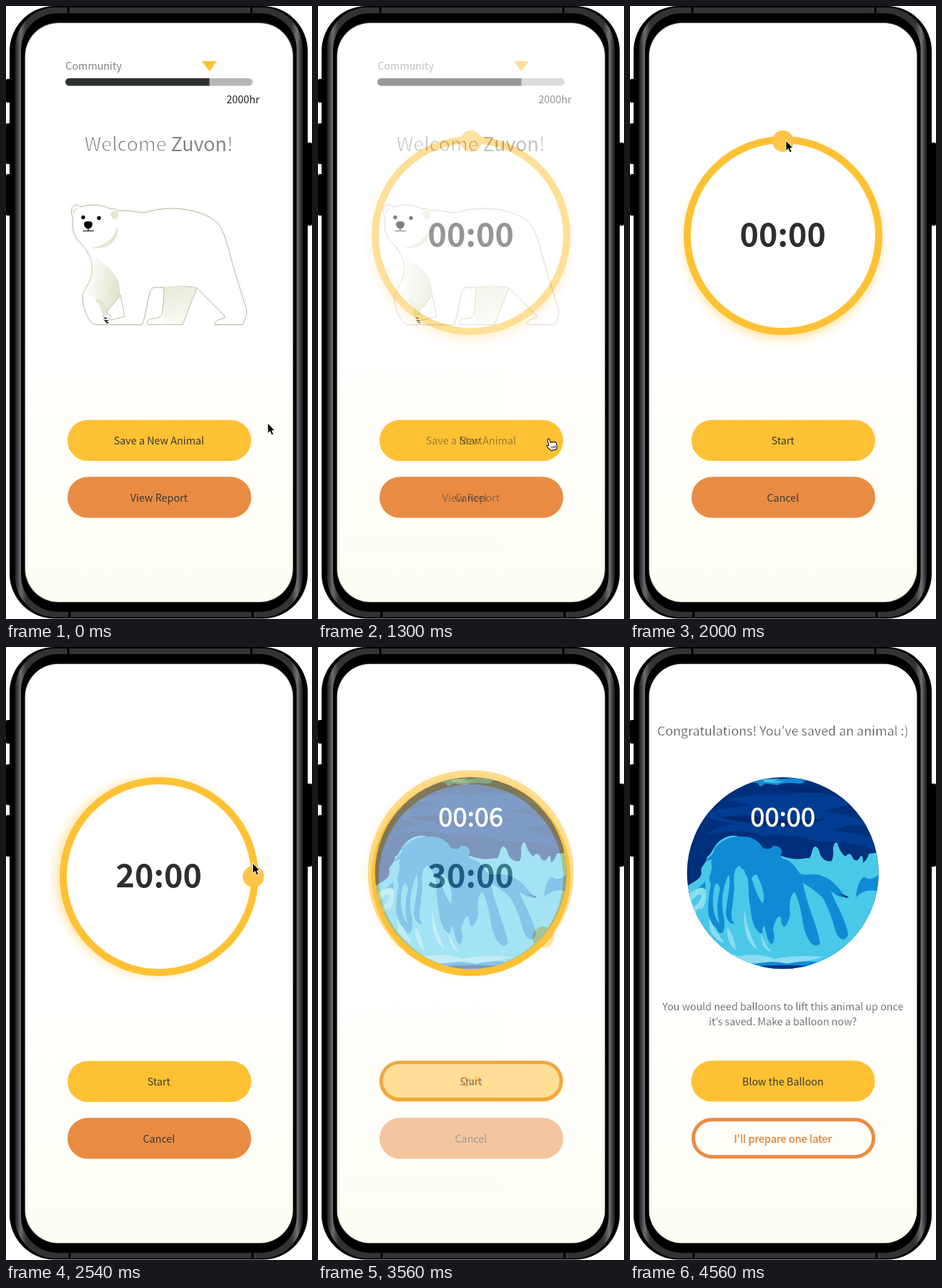
Recreate the animation shown at these times as an HTML page. Size 428 by 857 pixels, loop 6560 ms.

```html
<!DOCTYPE html>
<html lang="en">
<head>
<meta charset="utf-8">
<title>Save an animal</title>
<style>
html, body { margin: 0; width: 100%; height: 100%; overflow: hidden; background: #fff; }
svg { display: block; width: 428px; height: 857px; }
text {
  font: 400 14.33px "Noto Sans CJK JP", "Noto Sans CJK KR", "Noto Sans CJK SC", "Noto Sans", sans-serif;
  text-anchor: middle; fill: #3d3b32;
}
.community { text-anchor: start; fill: #828282; }
.hours { text-anchor: end; fill: #222; }
/* A white stroke thins the letters, a coloured one thickens them. */
.welcome { font-size: 26.8px; fill: #7c7c7c; stroke: #fff; stroke-width: .9; }
.welcome tspan { fill: #858585; stroke: none; }
.clock { font-size: 44.8px; font-weight: 700; fill: #2e2e30; }
.count { font-size: 36.4px; fill: #fff; stroke: #fff; stroke-width: .8; }
.congrats { font-size: 17.85px; fill: #3c3c3c; stroke: #fff; stroke-width: .5; }
.note { font-size: 14.25px; fill: #555; stroke: #fff; stroke-width: .25; }
.outlined { font-size: 14.6px; fill: #e0883f; stroke: #e0883f; stroke-width: .35; }
.yellow { fill: #ffc134; }
.orange { fill: #e98c43; }
.outline { fill: none; stroke: #e98c43; stroke-width: 5; }
.fur { fill: #fff; stroke: #aeab90; stroke-width: .8; stroke-linejoin: round; }
</style>
</head>
<body>
<svg viewBox="0 0 428 857">
  <defs>
    <linearGradient id="paper" x1="0" y1="0" x2="0" y2="1">
      <stop offset=".5" stop-color="#fff"/>
      <stop offset=".8" stop-color="#fffef8"/>
      <stop offset="1" stop-color="#fcfdf3"/>
    </linearGradient>
    <linearGradient id="metal" x1="0" y1="0" x2="1" y2="0">
      <stop offset="0" stop-color="#1c1c1d"/>
      <stop offset=".012" stop-color="#4a4a4c"/>
      <stop offset=".019" stop-color="#6c6c6e"/>
      <stop offset=".04" stop-color="#333335"/>
      <stop offset=".96" stop-color="#333335"/>
      <stop offset=".981" stop-color="#737176"/>
      <stop offset=".988" stop-color="#4f4e51"/>
      <stop offset="1" stop-color="#1c1c1d"/>
    </linearGradient>
    <linearGradient id="chest" x1="0" y1=".2" x2="1" y2=".4">
      <stop offset=".1" stop-color="#fff"/>
      <stop offset="1" stop-color="#e0e3cb"/>
    </linearGradient>
    <linearGradient id="thigh" x1=".2" y1="0" x2=".4" y2="1">
      <stop offset="0" stop-color="#e8ead9"/>
      <stop offset="1" stop-color="#fafaf3"/>
    </linearGradient>
    <filter id="soft" x="-20%" y="-20%" width="140%" height="140%"><feGaussianBlur stdDeviation="7"/></filter>
    <filter id="shade" x="-10%" y="-10%" width="120%" height="120%"><feGaussianBlur stdDeviation="2"/></filter>
    <clipPath id="disc"><circle cx="213.7" cy="316" r="134"/></clipPath>

    <rect id="bg" x="27" y="24" width="374" height="809" rx="46" fill="url(#paper)"/>
    <rect id="button" x="86" y="578.7" width="257" height="57.4" rx="28.7"/>
    <rect id="hollow" x="88.3" y="580.5" width="252" height="52" rx="26"/>

    <path id="body" d="M94 296C89 287 92 279 98 278Q102 278 104 281C118 277 133 277 146 284Q153 282 157 287C168 284 180 289 194 289C218 281 254 280 282 294C300 302 305 317 312 343C319 370 327 394 333 414C337 424 338 430 334 438L331 445.500H292Q293 438 304 437Q308 436 305 432L267 394C246 389 228 395 207 393C197 397 199 424 190 445.500H125C115 443 108 422 107 408C108 394 122 386 121 366C121 352 114 344 108 335C96 325 91 312 94 296Z"/>

    <g id="sea" clip-path="url(#disc)">
      <path fill="#002f7c" d="M78 180h272v272H78z"/>
      <path fill="#003c91" d="M92 232Q140 224 168 222Q150 214 130 216Q170 202 214 207Q260 197 300 213L326 217Q286 224 270 230Q310 234 346 250Q306 246 284 256Q322 260 350 272V286Q308 270 262 272Q230 260 184 264Q160 252 104 262Q126 250 148 247Q116 244 92 232Z"/>
      <path fill="#002a70" d="M126 238Q170 232 196 240Q240 244 276 239Q250 250 210 250Q160 247 126 238ZM206 196Q246 192 282 202Q240 208 206 196Z"/>
      <path fill="#148bd5" d="M158 189Q184 182 202 186Q226 181 252 186L240 188Q250 190 236 191Q218 188 206 193L190 191 182 195 178 190Z"/>
      <path fill="#49c8e8" d="M186 185l24-1-10 4 18-1-12 3-18-1Z"/>
      <path fill="#49c8e8" d="M76 338C88 327 98 327 100 316C97 306 106 306 108 293C115 290 117 275 130 268C142 262 150 263 157 268C168 264 178 271 185 281L212 292Q230 299 248 295Q252 297 254 288Q256 278 260 279Q264 281 266 290Q272 302 282 299Q285 294 284 281Q286 271 290 274Q293 286 301 293Q308 284 312 296Q318 302 322 293Q326 289 326 302Q332 297 334 289L350 287V452H76Z"/>
      <path fill="#118ad6" d="M113 332C107 318 118 314 113 301Q120 294 106 300C110 292 117 292 118 282C126 272 136 265 154 265C170 264 180 270 186 281Q195 285 200 278Q211 277 213 287Q208 293 214 296C226 298 232 309 238 317C250 321 260 314 270 321C288 326 296 347 306 350Q292 352 281 341C288 360 303 383 305 402C300 416 290 406 287 396C283 378 275 360 269 350Q256 338 242 330C247 360 262 390 266 414C257 425 247 408 243 392C240 372 236 352 230 342Q221 350 224 374C219 395 212 396 211 378Q206 372 200 394C205 412 198 424 192 406Q186 376 185 401C173 397 170 380 168 362C164 340 168 326 162 318Q157 304 152 314C151 332 161 350 150 380C146 392 136 388 134 372C136 350 142 330 138 318C132 330 127 350 130 372C136 396 128 410 120 392C106 384 108 360 113 332Z"/>
      <path fill="#118ad6" d="M316 350Q318 326 328 321Q335 329 350 317V342Q328 336 316 350ZM77 345Q90 344 105 328Q108 342 98 356Q88 350 77 360Z"/>
      <path fill="#49c8e8" d="M146 336Q143 307 154 306Q160 316 155 340Q159 372 149 386Q139 386 143 364ZM170 323Q177 313 180 324Q190 344 186 359Q178 350 170 323ZM117 340Q121 322 126 338Q119 364 125 387Q113 372 117 340Z"/>
      <path fill="#8bdcf0" d="M78 348Q100 330 106 340Q108 356 101 367Q94 361 89 378Q98 400 116 416Q132 428 153 432Q180 427 202 436Q230 430 270 433Q240 444 206 442Q170 440 150 444Q104 430 78 348ZM110 377Q119 396 132 414Q122 412 112 397ZM136 391Q146 403 148 425Q134 412 136 391ZM160 368Q164 396 178 423Q157 411 160 368ZM183 400Q188 416 198 426Q184 424 183 400Z"/>
      <path fill="#49c8e8" d="M86 355Q98 341 100 348Q98 358 88 364ZM100 390Q116 420 146 435Q120 434 104 412Z"/>
      <path fill="#118ad6" d="M172 444Q200 437 220 443Q238 438 262 440L248 447H186Z"/>
      <path fill="#003584" d="M172 447Q206 443 252 446V452H172ZM290 344l16 5-3 2Z"/>
    </g>
  </defs>

  <!-- phone -->
  <path d="M0 104q0-2 2-2h6v33H2q-2 0-2-2zM0 166q0-2 2-2h6v57H2q-2 0-2-2zM0 237q0-2 2-2h6v58H2q-2 0-2-2zM420 191h6q2 0 2 2v112q0 2-2 2h-6z"/>
  <rect x="5" width="417" height="856.500" rx="63"/>
  <rect x="12.500" y="2" width="402.500" height="852.500" rx="57" fill="url(#metal)"/>
  <rect x="21" y="10" width="385.500" height="837" rx="51"/>
  <path stroke="#0a0a0a" stroke-width="4" d="M87 1v10M343 1v10M89 847v9M345 847v9"/>
  <path stroke="#4a4a4a" d="M84.500 3v7M340.500 3v7M92 848v7M348 848v7"/>
  <rect x="26.500" y="23.500" width="375" height="810" rx="46.500" fill="none" stroke="#5c5c57"/>

  <g id="home">
    <use href="#bg"/>
    <text class="community" x="83.300" y="89.300">Community</text>
    <path class="yellow" d="M274 77h21l-10.500 14.500z"/>
    <rect x="83" y="101" width="262" height="10.500" rx="5.250" fill="#b7b7b7"/>
    <path fill="#2d3230" d="M88.250 101H284.500v10.500H88.250a5.250 5.250 0 0 1 0-10.500"/>
    <text class="hours" x="354.500" y="135.500">2000hr</text>
    <text class="welcome" x="213.700" y="203">Welcome <tspan>Zuvon</tspan>!</text>

    <use href="#body" fill="#9a9a80" opacity=".3" filter="url(#shade)"/>
    <use href="#body" class="fur"/>
    <path fill="url(#chest)" d="M115 345Q148 364 158 386L160 404 146 424 141 428Q134 412 125 409Q118 402 108 407C109 394 122 386 121 366Q121 354 115 345Z"/>
    <path fill="#e4e7d4" d="M119 338C139 334 153 326 155 306C160 324 148 342 119 338ZM146 289Q149 285 155 287Q159 290 156 296Q150 302 148 295ZM93 286Q97 281 102 283Q94 287 95 294ZM124 411Q134 407 138 418Q145 421 143 432L135 434Q134 419 124 411Z"/>
    <path class="fur" d="M160 404Q152 415 144 423L141 428 146 433Q143 439 147 439L166 434Z"/>
    <path fill="url(#thigh)" d="M221 393Q246 391 267 394L247 445H222Q217 420 221 393Z"/>
    <path fill="none" stroke="#aeab90" stroke-width=".8" d="M267 394L247 445.500H198Q195 439 204 437Q215 437 218 432Q221 414 221 394"/>
    <path d="M135 433q3 4 7 2l-3 3zM136 438q3 2 8 1l-4 3zM139 442h5l-2 2z"/>
    <circle cx="108" cy="295.500" r="2.700"/>
    <circle cx="130" cy="296.500" r="2.700"/>
    <path d="M109 305Q109 301 115 301Q121 301 121 305Q120 311 115 311.500Q110 311 109 305Z"/>
    <path fill="none" stroke="#000" stroke-width="1.200" d="M115 310v4.500M107.500 314.500H123"/>

    <use href="#button" class="yellow"/>
    <use href="#button" class="orange" y="79.500"/>
    <text x="213.900" y="613">Save a New Animal</text>
    <text x="213.900" y="692.500">View Report</text>
  </g>

  <g id="setup">
    <use href="#bg"/>
    <g id="dial">
      <circle class="yellow" cx="214" cy="328" r="138" opacity=".42" filter="url(#soft)"/>
      <circle cx="214" cy="321" r="134" fill="#fff" stroke="#ffc134" stroke-width="10"/>
      <circle cx="214" cy="189" r="15" fill="#ffc548"/>
    </g>
    <text class="clock" id="clock" x="213.700" y="336">00:00</text>
    <use href="#button" class="yellow"/>
    <use href="#button" class="orange" y="79.500"/>
    <text x="213.900" y="613">Start</text>
    <text x="213.900" y="692.500">Cancel</text>
  </g>

  <g id="run">
    <use href="#bg"/>
    <circle id="arc" cx="213.700" cy="316" r="139" fill="none" stroke="#ffc134" stroke-width="10" pathLength="360" transform="rotate(-90 213.700 316)"/>
    <use href="#sea"/>
    <text class="count" id="count" x="213.700" y="251">00:06</text>
    <use href="#hollow" class="outline"/>
    <text class="outlined" x="213.900" y="612">Quit</text>
  </g>

  <g id="done">
    <use href="#bg"/>
    <text class="congrats" x="213.800" y="123.500">Congratulations! You’ve saved an animal :)</text>
    <use href="#sea"/>
    <text class="count" x="213.700" y="251">00:00</text>
    <text class="note" x="213.800" y="507.500">You would need balloons to lift this animal up once</text>
    <text class="note" x="213.800" y="528.500">it’s saved. Make a balloon now?</text>
    <use href="#button" class="yellow" x="-.300" y="-.500"/>
    <use href="#hollow" class="outline" x=".300" y="80.200"/>
    <text x="213.900" y="613">Blow the Balloon</text>
    <text class="outlined" x="213.900" y="692.500">I'll prepare one later</text>
  </g>

  <g id="cursor">
    <path id="arrow" stroke="#fff" d="M0 0V14.500L3.300 11.600 5.600 17 8.200 15.900 6 10.700H10.200Z"/>
    <path id="hand" fill="#fff" stroke="#000" stroke-linejoin="round" transform="rotate(-13)" d="M-1.500 9.500V1Q0-1 1.500 1V6Q3 4.500 4.300 6.300Q6 5 7 6.800Q9 6 9.500 8V12.500L8 17H0L-4 11Q-5 8.500-3 8.500ZM2 11.500v3M4.300 11.500v3M6.600 11.500v3"/>
  </g>
</svg>
<script>
const LOOP = 6560;
const el = id => document.getElementById(id);
const show = (id, on) => { el(id).style.display = on ? "" : "none"; };
const lerp = (a, b, k) => a + (b - a) * k;

// Value at time t of a track of [time, value...] keys.
function at(keys, t, ease = k => k) {
  const i = keys.findIndex(key => key[0] > t);
  if (i === 0) return keys[0].slice(1);
  if (i < 0) return keys[keys.length - 1].slice(1);
  const [a, b] = [keys[i - 1], keys[i]];
  const k = ease((t - a[0]) / (b[0] - a[0]));
  return a.slice(1).map((v, n) => lerp(v, b[n + 1], k));
}
const smooth = k => k * k * (3 - 2 * k);

const pointer = [
  [0, 366, 583], [800, 321.5, 605], [1600, 322.5, 605], [2000, 218, 188],
  [2100, 304, 222], [2240, 320, 245], [2540, 345, 302], [2860, 330, 603.5]
];
const angle = [[2000, 0], [2100, 45], [2240, 55], [2540, 90], [2860, 130]];
const fades = {
  setup: [[1200, 0], [1400, 1]],
  run: [[3460, 0], [3660, 1]],
  done: [[4060, 0], [4460, 1]]
};

// The picture advances ten times a second, with two short pauses.
function tick(t) {
  const shift = t < 2240 ? 0 : t < 2660 ? 40 : 60;
  const s = Math.floor((t - shift) / 100) * 100 + shift;
  if (t < 2240) return Math.min(s, 2100);
  return t < 2660 ? Math.min(s, 2540) : s;
}

function draw(now) {
  const t = tick(now % LOOP);
  for (const id in fades) {
    const [o] = at(fades[id], t);
    show(id, o > 0);
    el(id).style.opacity = o;
  }

  el("dial").setAttribute("transform", `rotate(${at(angle, t)[0]} 214 321)`);
  const tens = [2100, 2440, 2760].filter(start => t >= start).length;
  el("clock").textContent = `${tens}0:00`;

  const gone = Math.min(6, Math.max(0, Math.floor((t - 3560) / 100)));
  const turn = gone * 59.7;
  show("arc", gone < 6);
  el("arc").setAttribute("stroke-dasharray", gone ? `0 ${turn} ${360 - turn} 0` : "none");
  el("count").textContent = `00:0${6 - gone}`;

  const [x, y] = at(pointer, t, smooth);
  const hovering = y > 579 && x < 342;
  show("cursor", t < 3560);
  el("cursor").setAttribute("transform", `translate(${x} ${y})`);
  show("hand", hovering);
  show("arrow", !hovering);
}

const begin = performance.now();
(function frame() {
  draw(performance.now() - begin);
  requestAnimationFrame(frame);
})();
</script>
</body>
</html>
```
